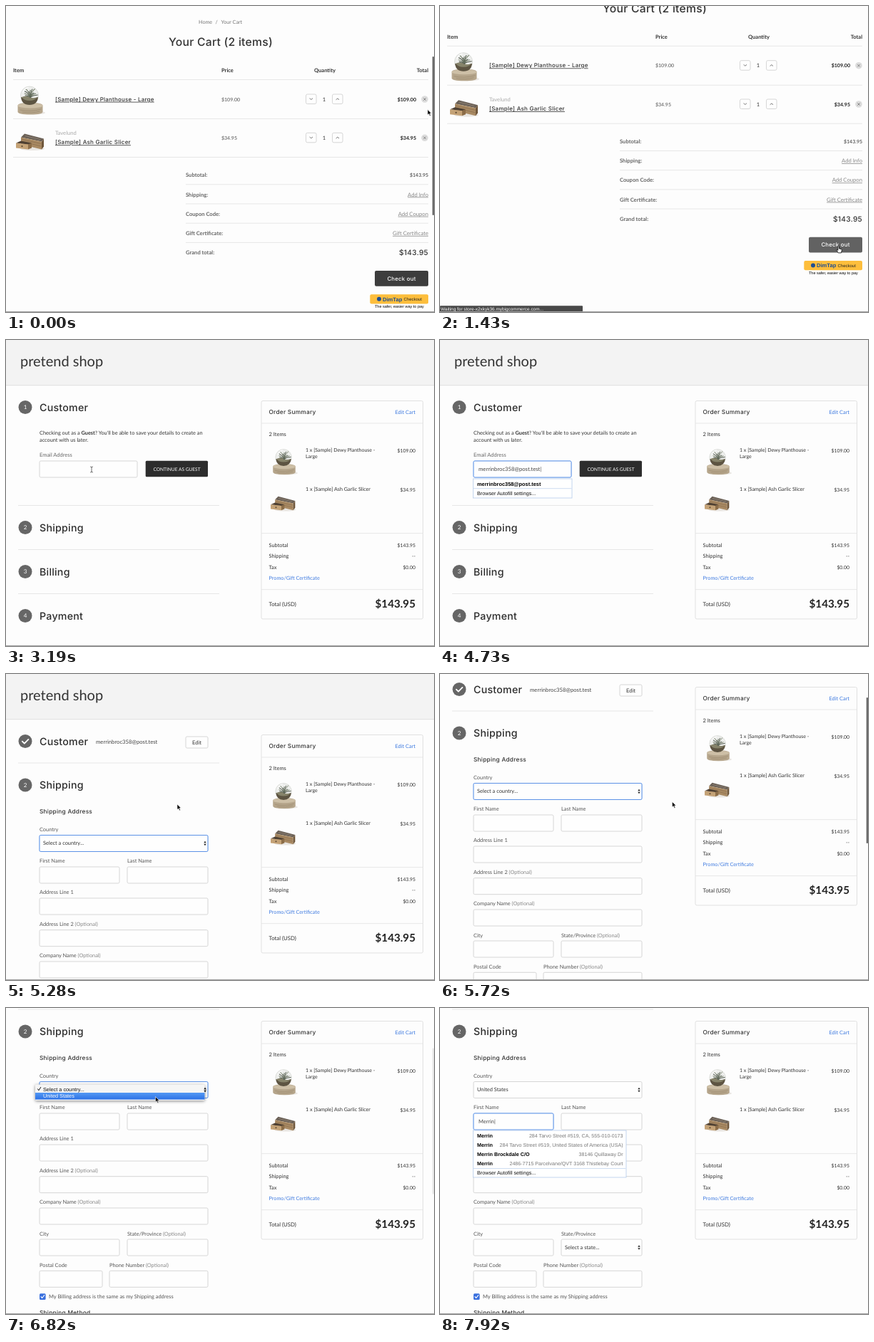
An HTML page that plays this animation: 600x430 px, repeating every 8000 ms.

```html
<!DOCTYPE html>
<html lang="en">
<head>
<meta charset="utf-8">
<title>Checkout</title>
<style>
html, body { margin: 0; width: 100%; height: 100%; overflow: hidden; background: #fdfdfd; }
svg { display: block; width: 600px; height: 430px; }
text { text-rendering: geometricPrecision; white-space: pre; }
.k { font-family: Lato, "Open Sans", sans-serif; }
.b { font-family: Lato, "Open Sans", sans-serif; font-weight: 700; }
.m { font-family: Inter, "Open Sans", sans-serif; font-weight: 500; letter-spacing: .25px; }
.s { font-family: "Liberation Sans", Arial, sans-serif; }
.sb { font-family: "Liberation Sans", Arial, sans-serif; font-weight: 700; }
.o { font-family: "Open Sans", sans-serif; }
.u { text-decoration: underline; text-decoration-thickness: .6px; text-underline-offset: 1px; }
.box { fill: #fefefe; stroke: #d2d2d2; stroke-width: .9; }
.box.on { stroke: #5c92e6; stroke-width: 1; filter: drop-shadow(0 0 .6px #a9c9f6); }
.menu { fill: #fff; stroke: #b3cbea; stroke-width: .8; }
</style>
</head>
<body>
<svg id="stage" viewBox="0 0 600 430"></svg>
<script>
const DARK = '#333', GREY = '#666', BLUE = '#3f7be0', LINE = '#e5e5e5';
const SHOP = 'pretend shop', MAIL = 'merrinbroc358@post.test', NAME = 'Merrin';
const JAR = '[Sample] Dewy Planthouse - Large', TOOL = '[Sample] Ash Garlic Slicer';
const AUTOFILL = 'Browser Autofill settings...';

// Markup helpers
const text = (x, y, str, cls = 'k', size = 7.5, fill = DARK, anchor = 'start', id = '') =>
  `<text x="${x}" y="${y}" class="${cls}" font-size="${size}" fill="${fill}" text-anchor="${anchor}"${id && ` id="${id}"`}>${str}</text>`;
const right = (x, y, str, cls, size, fill) => text(x, y, str, cls, size, fill, 'end');
const mid = (x, y, str, cls, size, fill) => text(x, y, str, cls, size, fill, 'middle');
const rect = (x, y, w, h, fill, r = 0, extra = '') =>
  `<rect x="${x}" y="${y}" width="${w}" height="${h}" rx="${r}" fill="${fill}" ${extra}/>`;
const field = (x, y, w, id = '', h = 23) =>
  `<rect x="${x}" y="${y}" width="${w}" height="${h}" rx="1.8" class="box" id="${id}"/>`;
const line = (x1, x2, y, color = LINE) => `<path d="M${x1} ${y}H${x2}" stroke="${color}" stroke-width=".9"/>`;
const stroke = (d, color, w = 1) =>
  `<path d="${d}" fill="none" stroke="${color}" stroke-width="${w}" stroke-linecap="round" stroke-linejoin="round"/>`;
const group = (id, body, extra = '') => `<g id="${id}" ${extra}>${body}</g>`;
const put = (id, x, y, k = 1) => `<use href="#${id}" transform="translate(${x} ${y}) scale(${k})"/>`;
const arrows = (x, y) => `<path d="M${x - 1.7} ${y - .8}h3.4l-1.7-2.4zM${x - 1.7} ${y + .8}h3.4l-1.7 2.4z" fill="#222"/>`;

// Product pictures, centred on 0,0
function jarArt() {
  let leaves = '';
  for (let i = 0; i < 11; i++) {
    const a = Math.PI * (1.06 + i * .088), r = 7 + (i * 5 % 4) * 1.7;
    leaves += stroke(`M0 -3Q${r * Math.cos(a) * .4} ${r * Math.sin(a) * .8 - 4} ${r * Math.cos(a)} ${r * Math.sin(a) - 4}`,
      i % 2 ? '#7b8470' : '#4d564a', 1.1);
  }
  return group('jar', `<ellipse cx="5" cy="19" rx="16" ry="2.6" fill="#e9e6e2"/>
    <path d="M-17.5 9Q-17.5 5 0 5T17.5 9V17.5Q17.5 21.5 0 21.5T-17.5 17.5Z" fill="#b5a58b"/>
    <ellipse cy="9" rx="17.5" ry="3.6" fill="#cdbfa6"/>
    ${stroke('M-14 15Q0 18.5 15 14M-11 18Q2 20.5 13 17', '#9f8d71', .8)}
    <circle cx="-1" cy="-5.5" r="12.5" fill="#eeefed" stroke="#cfd1cd" stroke-width=".7"/>
    <path d="M-13 -3Q-1 1 11 -3Q10 8 -1 8T-13 -3Z" fill="#5d5442"/>
    <path d="M-12 -3Q-6 -6 0 -3T10 -3Q7 2 -1 2T-12 -3Z" fill="#86836a"/>${leaves}
    ${stroke('M-10 -10Q-8 -15 -3 -16.5', '#fff', 1.3)}`);
}
const toolArt = () => group('tool', `<ellipse cx="2" cy="10" rx="17" ry="2.6" fill="#e9e6e2"/>
  <path d="M-14 -6L-9 -11L18 -4L15 0Z" fill="#6a6056"/>
  <path d="M-14 -6L15 0V11L-14 4Z" fill="#a98a63"/>
  <path d="M15 0L18 -4V7L15 11Z" fill="#6f563a"/>
  ${stroke('M-13 -3L14 3M-13 0L14 6.5', '#86694a', .7)}
  ${stroke('M-8 -8L13 -3', '#94877a', .9)}
  <path d="M-21 2L-14 -1L1 2L-4 4Z" fill="#4f4133"/>
  <path d="M-4 4L1 2V9L-4 11Z" fill="#8c6d48"/>
  <path d="M-21 2L-4 4V11L-21 9Z" fill="#c4a276"/>
  <circle cx="-12.5" cy="6.6" r="1.1" fill="#574430"/>`);

const pointerArt = () => group('arrow', `<path d="M0 0V7.6L1.8 6L3.1 8.9L4.4 8.3L3.1 5.5H5.4Z" fill="#000" stroke="#fff" stroke-width=".6"/>`)
  + group('hand', `<path d="M-.6 0Q.4 -.8 1 .2V3.4L4.3 4.2Q5 4.6 4.8 5.8L4 9.4H-.2L-2.6 5.8Q-2.6 4.6 -1.4 5.2L-.6 5.9Z" fill="#fff" stroke="#000" stroke-width=".8"/>`)
  + group('beam', stroke('M-1.5 -4Q0 -4 0 -3V3Q0 4 -1.5 4M1.5 -4Q0 -4 0 -3M0 3Q0 4 1.5 4', '#333', .7));

function cartRow(y, price) {
  const btn = (x, d) => rect(x, y - 7, 14.5, 13.5, '#fefefe', 2, 'stroke="#ccc" stroke-width=".8"')
    + stroke(`M${x + 5.4} ${y - .3 - d}l1.9 ${2 * d}l1.9 ${-2 * d}`, '#555', .8);
  return text(302, y + 2.7, price, 'k', 7, '#555') + btn(420.5, .8) + btn(457.5, -.8)
    + mid(446, y + 2.7, '1', 'k', 7.5) + right(575, y + 2.7, price, 'b', 7.1, '#222')
    + `<circle cx="587" cy="${y}" r="4.8" fill="#dcdcdc"/>`
    + stroke(`M585.5 ${y - 1.5}l3 3m0 -3l-3 3`, GREY, .7);
}

function cart() {
  let out = text(270, 25, 'Home', 'k', 7.2, '#777') + text(293.5, 25, '/', 'k', 7.2, '#777')
    + text(301.5, 25, 'Your Cart', 'k', 7.2, '#777')
    + mid(301, 56.3, 'Your Cart (2 items)', 'm', 15.7)
    + text(10, 93, 'Item', 'b') + text(302, 93, 'Price', 'b') + mid(447, 93, 'Quantity', 'b') + right(592, 93, 'Total', 'b');
  for (const y of [103.5, 158.5, 212.5]) out += line(10, 592, y);
  out += put('jar', 34, 131) + text(69, 133.7, JAR, 'm u', 7.9) + cartRow(131, '$109.00')
    + put('tool', 35, 190.5) + text(69, 181, 'Tavelund', 'k', 7.6, '#aaa') + text(69, 194.3, TOOL, 'm u', 8) + cartRow(185.3, '$34.95');
  ['Subtotal:', 'Shipping:', 'Coupon Code:', 'Gift Certificate:', 'Grand total:'].forEach((label, i) => {
    const y = 240.3 + i * 27.2;
    out += text(252, y, label, 'b', 7.6, GREY);
    if (i < 4) out += line(252, 592, y + 10.5);
  });
  out += right(592, 240.3, '$143.95', 'k', 7, DARK);
  ['Add Info', 'Add Coupon', 'Gift Certificate'].forEach((s, i) => out += right(592, 267.5 + i * 27.2, s, 'k u', 7.7, '#888'));
  out += right(592, 350, '$143.95', 'm', 10.2)
    + rect(517, 372, 75, 21.7, '#3d3d3d', 2, 'id="buy"') + mid(554.5, 385.7, 'Check out', 'm', 7.8, '#fff')
    + rect(510.3, 405.2, 81.7, 13.3, '#fdbe3c', 2) + '<circle cx="523" cy="411.8" r="3" fill="#1f4f93"/>'
    + text(528, 414.6, 'DimTap', 'sb', 7.6, '#1f4f93') + text(557.5, 414, 'Checkout', 's', 6, '#222')
    + text(517, 424.3, 'The safer, easier way to pay', 's', 5.5, '#000');
  return out;
}

const step = (n, y, name) => `<circle cx="27" cy="${y}" r="9.5" fill="#666"/>`
  + (n ? mid(27, y + 2.8, n, 'k', 8, '#fff') : stroke(`M22.8 ${y + .2}l3 3l5.6 -5.8`, '#fff', 1.8))
  + text(47, y + 5, name, 'm', 14.2, '#2c2c2c');

const guest = () => step(1, 94.5, 'Customer')
  + text(47, 133, 'Checking out as a <tspan font-weight="700">Guest</tspan>? You\'ll be able to save your details to create an', 'k', 7.33)
  + text(47, 143, 'account with us later.', 'k', 7.33)
  + text(47, 164, 'Email Address', 'k', 7.5, GREY)
  + field(47, 170, 137, 'mailBox') + text(54, 184, '', 'k', 7.7, '#444', 'start', 'mailText')
  + rect(195.7, 169.8, 87.3, 22.5, '#2d2d2d', 1.5, 'id="go"') + mid(239.5, 183.5, 'CONTINUE AS GUEST', 'k', 6.6, '#fff')
  + line(17, 299, 232.5) + step(2, 263.5, 'Shipping') + line(17, 299, 294.5)
  + step(3, 325.5, 'Billing') + line(17, 299, 356.5) + step(4, 387.5, 'Payment')
  + group('mailMenu', rect(46.5, 195, 138.5, 27, '#fff', 0, 'class="menu"') + line(47, 184.5, 208.7, '#c9daf0')
    + text(52, 204.6, MAIL, 'sb', 7.4, '#000') + text(52, 218.2, AUTOFILL, 's', 7.2, '#111'));

function shipping() {
  const opt = ' <tspan fill="#888">(Optional)</tspan>';
  const label = (x, y, s, id) => text(x, y, s, 'k', 7.4, '#555', 'start', id);
  const head = (y, s) => text(47, y, s, 'm', 8.3);
  return step(0, 94.5, 'Customer') + text(126, 98, MAIL, 'k', 7.7, '#444')
    + field(252, 88, 31, '', 16) + mid(267.5, 98.8, 'Edit', 'k', 7.6)
    + line(17, 299, 125) + step(2, 156, 'Shipping') + head(195.5, 'Shipping Address')
    + label(47, 221, 'Country') + field(47, 226.5, 236, 'landBox') + text(52, 240.2, '', 'k', 7.4, DARK, 'start', 'landText') + arrows(279, 238)
    + label(47, 265, 'First Name') + field(47, 271, 112, 'nameBox') + text(54, 285, '', 'k', 7.4, '#444', 'start', 'nameText')
    + label(170, 265, 'Last Name') + field(170, 271, 113)
    + label(47, 309, 'Address Line 1') + field(47, 315, 236)
    + label(47, 353.7, 'Address Line 2' + opt) + field(47, 359.7, 236)
    + label(47, 398, 'Company Name' + opt) + field(47, 404, 236)
    + label(47, 442.5, 'City') + field(47, 448, 112)
    + label(170, 442.5, 'State/Province<tspan id="stateOpt">' + opt + '</tspan>') + field(170, 448, 113)
    + group('stateSel', text(175, 462, 'Select a state...', 'k', 7.4) + arrows(279, 459.5))
    + label(47, 486.5, 'Postal Code') + field(47, 492.3, 88)
    + label(145, 486.5, 'Phone Number' + opt) + field(145, 492.3, 138)
    + rect(47, 524.3, 8.6, 8.6, '#3a70de', 1.5) + stroke('M49 528.7l1.7 1.8l3 -3.8', '#fff', 1.1)
    + text(60, 531.3, 'My Billing address is the same as my Shipping address', 'k', 7.45, '#555')
    + head(554, 'Shipping Method')
    + group('landMenu', rect(41, 230.5, 237.5, 22.5, '#f5f5f5', 1.5, 'style="filter:drop-shadow(0 1px 2px #0007)"')
      + rect(41, 242, 237.5, 9.6, 'url(#blue)') + stroke('M44.5 236.8l1.4 2l2.8 -4.4', '#111', 1)
      + text(52, 239.7, 'Select a country...', 's', 7.3, '#111') + text(52, 249.4, 'United States', 's', 7.3, '#fff') + arrows(279, 238))
    + group('nameMenu', rect(46.5, 295, 214.5, 66, '#fff', 0, 'class="menu"') + line(47, 260.5, 348.5, '#c9daf0')
      + [[NAME, '284 Tarvo Street #519, CA, 555-010-0173'],
         [NAME, '284 Tarvo Street #519, United States of America (USA)'],
         [NAME + ' Brockdale C/O', '38146 Quillaway Dr'],
         [NAME, '2486-7715 Parcelvane/QVT 3168 Thistlebay Court']]
        .map(([a, b], i) => text(52, 304.8 + i * 12.9, a, 'sb', 7.2, '#000') + right(256.5, 304.8 + i * 12.9, b, 's', 7.1, '#777')).join('')
      + text(52, 357, AUTOFILL, 's', 7.2, '#111'));
}

const summary = () => rect(358, .5, 226.5, 306.5, '#fdfdfd', 2, 'stroke="#dedede" stroke-width=".9"')
  + text(368.5, 18.8, 'Order Summary', 'm', 8.3) + right(574, 18.8, 'Edit Cart', 'k', 7.4, BLUE) + line(358, 584, 32)
  + text(368.5, 50, '2 Items')
  + put('jar', 390, 84.8, .9) + text(420, 72, '1 x ' + JAR.slice(0, -6), 'k', 7) + text(420, 80.8, 'Large', 'k', 7)
  + right(574, 72.7, '$109.00', 'k', 6.9)
  + put('tool', 389.5, 144.5, .88) + text(420, 127, '1 x ' + TOOL, 'k', 7.2) + right(574, 127.7, '$34.95', 'k', 6.9)
  + line(358, 584, 186.7)
  + [['Subtotal', '$143.95'], ['Shipping', '--'], ['Tax', '$0.00']]
    .map(([a, b], i) => text(368.5, 205.7 + i * 15.4, a, 'k', 7.4) + right(574, 205.7 + i * 15.4, b, 'k', 6.9)).join('')
  + text(368.5, 252.3, 'Promo/Gift Certificate', 'k', 7.25, BLUE) + line(358, 584, 265.7)
  + text(368.5, 288.7, 'Total (USD)', 'k', 7.8) + right(574, 291.3, '$143.95', 'b', 15.2, '#222');

document.getElementById('stage').innerHTML =
  `<defs><linearGradient id="blue" x2="0" y2="1"><stop stop-color="#5499f4"/><stop offset="1" stop-color="#2d72e6"/></linearGradient>${jarArt() + toolArt()}</defs>`
  + rect(0, 0, 600, 430, '#fdfdfd')
  + group('cart', cart())
  + group('page', rect(0, 0, 600, 63.5, '#f3f3f3') + line(0, 600, 63.7, '#dcdcdc') + text(20, 37, SHOP, 'k', 20, DARK)
    + group('guest', guest()) + group('ship', shipping()))
  + group('sum', summary())
  + group('spin', stroke('M311.6 157.4A16.6 16.6 0 0 1 299.5 187', '#b5b5b5', .8))
  + group('pill', rect(274.5, 39, 53.5, 20, '#333', 2, 'style="filter:drop-shadow(0 0 2px #b9d3ef)"') + mid(301, 52, 'Loading...', 'o', 7.9, '#fff'))
  + rect(597.7, 0, 2.3, 10, '#6b6b6b', 1, 'id="bar"')
  + group('status', rect(0, 421.3, 200, 9, '#484848', 1) + text(1, 428, 'Waiting for store-x2xkyk36.mybigcommerce.com...', 's', 6.45, '#fff'))
  + rect(0, 429, 600, 1, '#a2a2a2') + pointerArt();

const $ = id => document.getElementById(id);
const show = (id, on) => { $(id).style.display = on ? '' : 'none'; };
const move = (id, x, y) => $(id).setAttribute('transform', `translate(${x} ${y})`);

// Linear lookup in a table of [time, value, ...]
function at(keys, t) {
  let i = 0;
  while (i < keys.length - 2 && t >= keys[i + 1][0]) i++;
  const [a, b] = [keys[i], keys[i + 1]];
  const p = Math.min(1, Math.max(0, (t - a[0]) / (b[0] - a[0])));
  return a.slice(1).map((v, n) => v + (b[n + 1] - v) * p);
}

const CART_SCROLL = [[110, 0], [330, 14], [660, 40], [880, 47.3]];
const PAGE_SCROLL = [[5280, 0], [5500, 28], [5720, 73], [5940, 109], [6160, 123]];
const BAR_FADE = [[0, 1], [880, 1], [1210, 0], [5280, 0], [5390, 1], [6380, 1], [6820, .15], [6930, 0]];
const POINTER = [[0, 591, 145.5], [330, 589, 158], [880, 577, 255], [1210, 558.5, 337.5], [1870, 558.5, 337.5],
  [2420, 362.5, 130.5], [2750, 280, 148], [3190, 120, 182], [4730, 120, 182], [4950, 240, 183], [5280, 240, 183],
  [5720, 325.5, 179.5], [6160, 325.5, 179.5], [6490, 212, 115], [6710, 209.5, 124.5], [7150, 209.5, 125], [7370, 90, 160]];

const within = (t, a, b) => t >= a && t < b;

function pointerKind(t) {
  if (within(t, 3520, 4840) || t >= 7480) return '';
  if (within(t, 1100, 1760) || within(t, 4950, 5170)) return 'hand';
  if (within(t, 3080, 3520) || t >= 7370) return 'beam';
  return 'arrow';
}

function type(id, str, count, focus) {
  const n = Math.max(0, Math.min(str.length, Math.round(count)));
  $(id).textContent = str.slice(0, n) + (focus ? '|' : '');
  return n;
}

function draw(time) {
  const t = Math.floor(time / 110) * 110;
  const inCart = t < 1760, ready = t >= 2640, guestStep = ready && t < 5170, shipStep = t >= 5170;
  const cs = at(CART_SCROLL, t)[0], ps = at(PAGE_SCROLL, t)[0];

  show('cart', inCart);
  move('cart', 0, -cs);
  $('buy').setAttribute('fill', within(t, 1100, 1760) ? '#626262' : '#3d3d3d');
  show('status', within(t, 1430, 1980));

  show('page', !inCart);
  move('page', 0, -ps);
  show('guest', guestStep);
  show('ship', shipStep);
  show('sum', ready);
  move('sum', 0, Math.max(85 - ps, 18));
  show('spin', within(t, 1870, 2640));
  $('spin').setAttribute('transform', `rotate(${(t - 2420) * .36} 301 170.5)`);
  show('pill', within(t, 1980, 2750));

  const mailFocus = within(t, 3300, 4950);
  const typed = type('mailText', MAIL, (t - 3520) / 1100 * MAIL.length, mailFocus);
  $('mailBox').classList.toggle('on', mailFocus);
  show('mailMenu', mailFocus && typed > 0);
  $('go').setAttribute('fill', within(t, 4950, 5170) ? '#505050' : '#2d2d2d');

  const chosen = t >= 7150, nameFocus = t >= 7370;
  $('landText').textContent = chosen ? 'United States' : 'Select a country...';
  $('landBox').classList.toggle('on', !nameFocus);
  show('landMenu', within(t, 6490, 7150));
  show('stateSel', t >= 7260);
  show('stateOpt', t < 7260);
  $('nameBox').classList.toggle('on', nameFocus);
  const letters = type('nameText', NAME, (t - 7370) / 495 * NAME.length, nameFocus);
  show('nameMenu', nameFocus && letters > 0);

  $('bar').setAttribute('y', inCart ? 71 + cs * .5 : 33 + (ps - 73) * .47);
  $('bar').setAttribute('height', inCart ? 223 : 205);
  $('bar').setAttribute('opacity', at(BAR_FADE, t)[0]);

  const kind = pointerKind(t), [x, y] = at(POINTER, t);
  for (const id of ['arrow', 'hand', 'beam']) {
    show(id, id === kind);
    move(id, x, y);
  }
}

const start = performance.now();
function tick() {
  draw((performance.now() - start) % 8000);
  requestAnimationFrame(tick);
}
tick();
</script>
</body>
</html>
```
